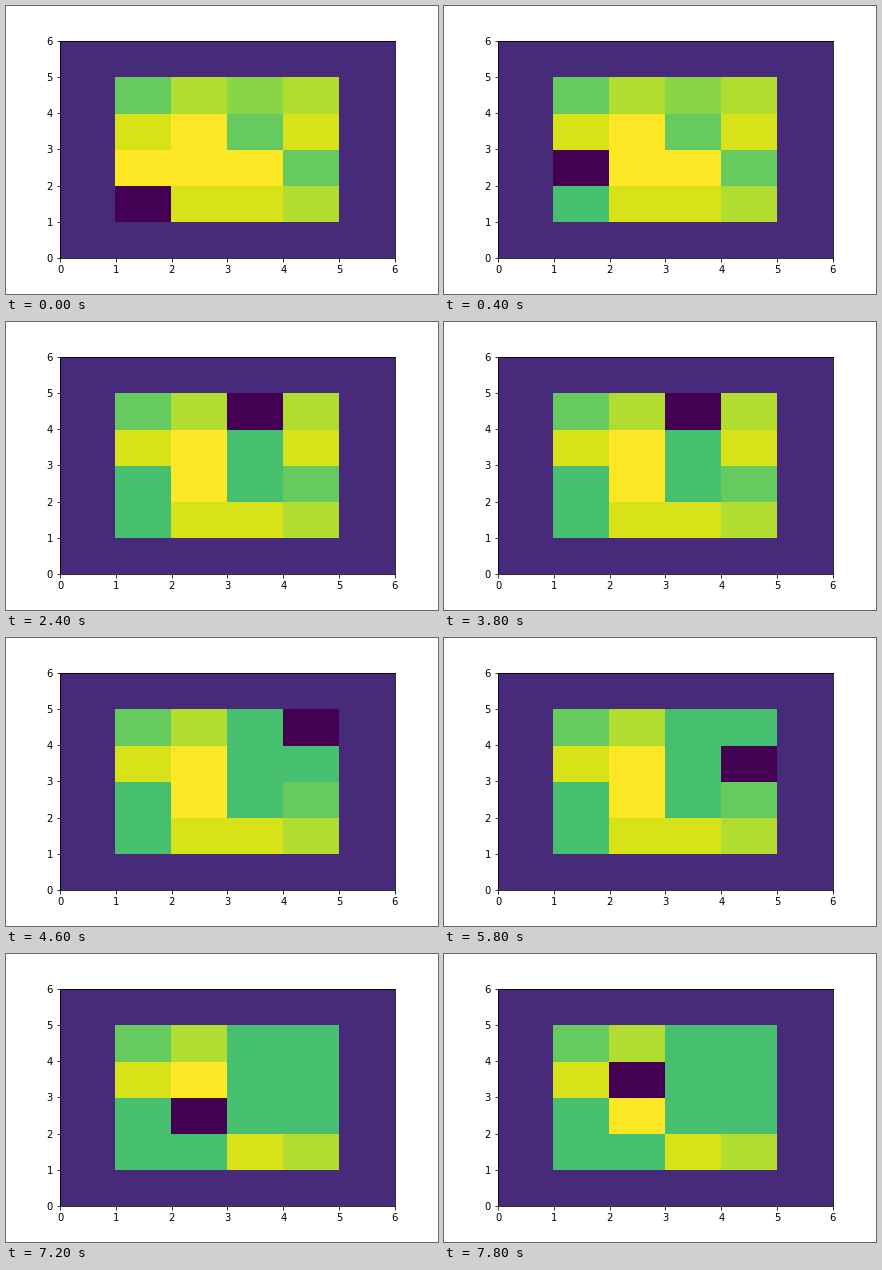
Animation, 432 px wide and 288 px high, one loop 8000 ms. Source, as a matplotlib script:

```python
import numpy as np
import matplotlib.pyplot as plt
from matplotlib.animation import FuncAnimation
from matplotlib.transforms import Affine2D

STEP_MS = 200
AGENT, WALL, CLEAN, MAX_DIRT = -12, -10, 0, 5

# dirt level of each tile, top row first
FLOOR = "1323 4514 5551 5443"
# one action per step: a dot cleans the tile, a letter moves
ACTIONS = "..U.RR.U....U.D....UDR.U.....DD.LLD.UUDU"
MOVES = {"U": (0, 1), "D": (0, -1), "L": (-1, 0), "R": (1, 0)}


def simulate():
    """Yield the floor, with the agent on it, after every action."""
    floor = np.array([[int(c) for c in row] for row in FLOOR.split()])[::-1]
    x = y = 0
    for action in ACTIONS:
        if action in MOVES:
            dx, dy = MOVES[action]
            x, y = x + dx, y + dy
        else:
            floor[y, x] = CLEAN
        view = floor.copy()
        view[y, x] = AGENT
        yield view


states = list(simulate())
fig, ax = plt.subplots(figsize=(6, 4), dpi=72)
fig.subplots_adjust(bottom=0.125)

edges = np.arange(1, 6)
mesh = ax.pcolormesh(edges, edges, states[0], cmap="viridis",
                     vmin=AGENT, vmax=MAX_DIRT)
# round tile edges down to whole pixels
mesh.set_transform(ax.transData + Affine2D().translate(-0.48, -0.48))
ax.set(xlim=(0, 6), ylim=(0, 6), facecolor=mesh.cmap(mesh.norm(WALL)))


def update(i):
    mesh.set_array(states[i])
    return (mesh,)


anim = FuncAnimation(fig, update, frames=len(states), interval=STEP_MS,
                     repeat=True, repeat_delay=0, blit=False)
plt.show()
```
